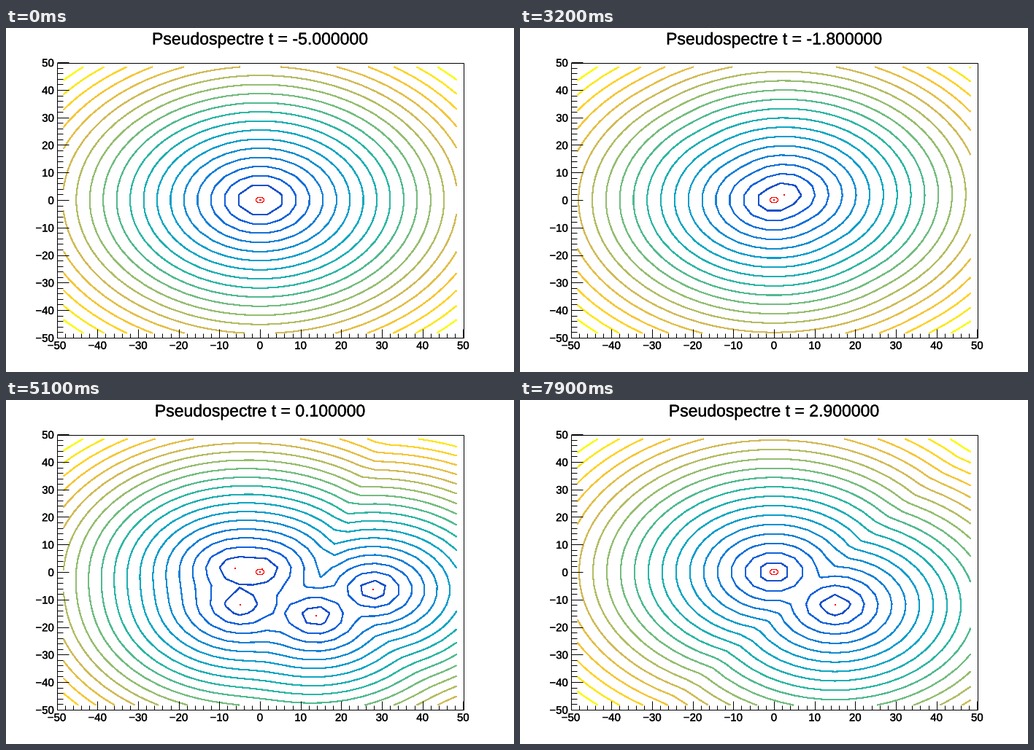
Write a matplotlib script that moves like this. It is 696x472 px and loops after 8000 ms.

```python
import numpy as np
import matplotlib.pyplot as plt
from matplotlib.animation import FuncAnimation
from matplotlib.patches import Ellipse, Rectangle
from matplotlib.patheffects import withStroke

W, H, DPI = 696, 472, 100
PX = 72 / DPI
FRAMES, BINS, LEVELS = 80, 30, 20
plt.rcParams["font.family"] = "Liberation Sans"
BOLDER = [withStroke(linewidth=0.3 * PX, foreground="black")]

fig = plt.figure(figsize=(W / DPI, H / DPI), dpi=DPI, facecolor="white")
ax = fig.add_axes([0, 0, 1, 1])
ax.set(xlim=(0, W), ylim=(H, 0))
ax.axis("off")


def px(x):
    return W / 2 + x * W * 0.008


def py(y):
    return H / 2 - y * H * 0.008


# Colour map running from deep blue to yellow
STOPS = np.array([
    [0.2082, 0.0592, 0.0780, 0.0232, 0.1802, 0.5301, 0.8186, 0.9956, 0.9764],
    [0.1664, 0.3599, 0.5041, 0.6419, 0.7178, 0.7492, 0.7328, 0.7862, 0.9832],
    [0.5293, 0.8684, 0.8385, 0.7914, 0.6425, 0.4662, 0.3499, 0.1968, 0.0539],
])


def level_color(i):
    pos = int((i + 0.99) * 255 / LEVELS) / 254
    return tuple(np.interp(pos, np.linspace(0, 1, 9), ch) for ch in STOPS)


COLORS = [level_color(i) for i in range(1, LEVELS)]

# Grid of bin centres
nodes = (np.arange(BINS) + 0.5) * 100 / BINS - 50
Z = nodes[None, :] + 1j * nodes[:, None]
EYE = np.eye(6)

# Short-lived perturbation, in triangular form; two columns fade faster
PULSE = np.diag([0, 0.62 + 1.15j, -6.3 + 1.5j, -5.2 - 12.9j,
                 15.0 - 17.2j, 12.5 + 6.3j])
PULSE[0, 2] = 1.5
PULSE[0, 3] = 3
PULSE[1, 2] = 4.5
PULSE[1, 3] = 4j
PULSE[2, 3] = 5.5
PULSE[3, 4] = 5
PULSE[4, 5] = 1.5
DECAY = np.array([4, 4, 4, 8, 8, 4])


def drift(t):
    """Eigenvalue that grows out of the origin and settles at 15 - 12i."""
    u = np.clip((t + 0.6) / 0.7, 0, 1)
    w = u * u * (3 - 2 * u)
    before = (15 + 12j) * np.exp(min(t, 0))
    after = 15 - 12j + (1 - 0.5j) * np.exp(-max(t, 0))
    return (1 - w) * before + w * after


def matrix(t):
    a = PULSE * np.exp(-DECAY * t * t)
    a[5, 5] += drift(t)
    return a


def smallest_singular(a):
    shifted = Z[..., None, None] * EYE - a
    return np.linalg.svd(shifted, compute_uv=False)[..., -1]


def line(x, y):
    ax.plot(x, y, color="black", lw=PX, solid_capstyle="butt", zorder=3)


def label(x, y, value, ha):
    ax.text(x, y, str(value).replace("-", "\u2212"), fontsize=15 * PX,
            ha=ha, va="baseline", path_effects=BOLDER)


L, R, T, B = 69.5, 626.5, 47.5, 424.5
ax.add_patch(Rectangle((L, T), R - L, B - T, fill=False, ec="black", lw=PX,
                       zorder=3))
for v in range(-50, 51, 2):
    size = 1 if v % 10 == 0 else 0.5
    line([px(v)] * 2, [B, B - 11.3 * size])
    line([L, L + 16.7 * size], [py(v)] * 2)
    if size == 1:
        label(px(v), 440.5, v, "center")
        label(66, py(v) + 5.7, v, "right")

title = ax.text(W / 2, 22.5, "", fontsize=23 * PX, ha="center", va="baseline",
                path_effects=BOLDER)
# Unsmoothed strokes cover every touched pixel, so their widths are set thinner
ax.add_patch(Ellipse((px(0), py(0)), 2 * (px(1) - px(0)), 2 * (py(0) - py(1)),
                     fill=False, ec="red", lw=0.2 * PX, antialiased=False,
                     zorder=4))
dots = ax.scatter([], [], s=(2.2 * PX) ** 2, marker="s", color="red",
                  linewidths=0, antialiased=False, zorder=5)
current = []


def update(n):
    t = (n - 50) / 10
    a = matrix(t)
    s = smallest_singular(a)
    lo, hi = s.min(), s.max()
    levels = lo + (hi - lo) * np.arange(1, LEVELS) / LEVELS
    while current:
        current.pop().remove()
    current.append(ax.contour(px(nodes), py(nodes), s, levels=levels,
                              colors=COLORS, linewidths=1.1 * PX,
                              antialiased=False, zorder=2))
    ax.set(xlim=(0, W), ylim=(H, 0))
    eig = np.diag(a)
    dots.set_offsets(np.column_stack([px(eig.real), py(eig.imag)]))
    title.set_text(f"Pseudospectre t = {t:.6f}")
    return []


anim = FuncAnimation(fig, update, frames=FRAMES, interval=100, repeat=True,
                     repeat_delay=0, blit=False)
plt.show()
```
